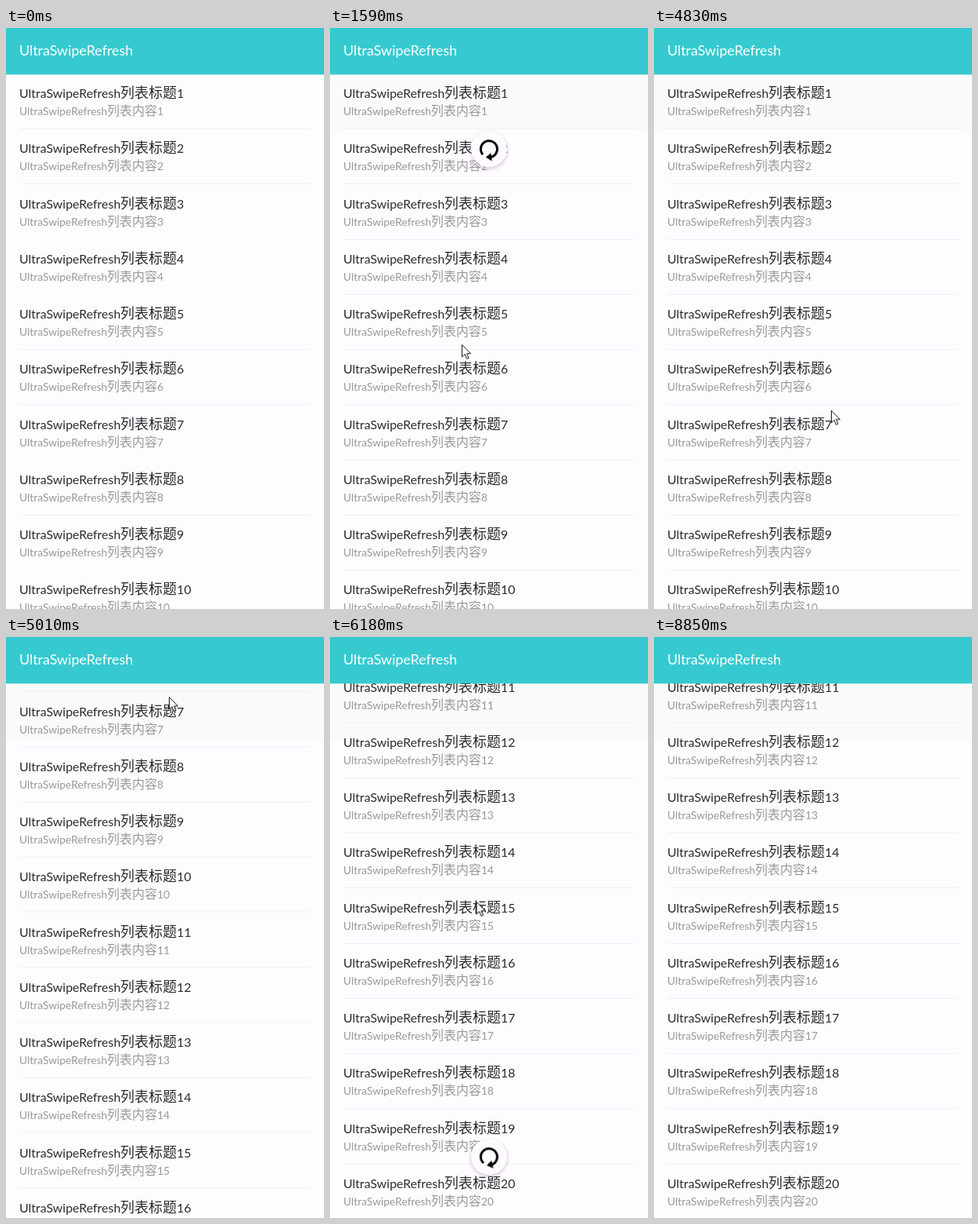
Write an HTML page that moves like this. It is 406 by 740 pixels and loops after 9510 ms.

```html
<!DOCTYPE html>
<html lang="zh">
<head>
<meta charset="utf-8">
<title>UltraSwipeRefresh</title>
<style>
  html, body { margin: 0; width: 100%; height: 100%; overflow: hidden; }
  body { position: relative; background: #fefcff; }
  header, main, .tint, .glow, .row, .row *, .puck, .cursor { position: absolute; }
  header {
    inset: 0 0 auto; height: 59px; padding-left: 17px;
    background: #36cad0; color: #fff;
    box-shadow: 0 1px rgba(54, 202, 208, .35);
    font: 17.9px/57px Lato, sans-serif;
  }
  main { inset: 59px 0 0; overflow: hidden; }
  .tint { inset: 0 0 auto; height: 70px; background: #f8fafb; }
  .glow {
    left: -37px; top: 644px; width: 480px; height: 80px;
    border-radius: 50%; background: #96649e;
  }
  .row { left: 17px; width: 372px; height: 70.25px; white-space: nowrap; }
  .row p { margin: 0; left: 0; font: 300 18px/20px "Noto Sans CJK SC", "Noto Sans CJK", sans-serif; }
  .title { top: 12px; color: #2c2b2e; }
  .row .note { top: 35px; color: #99989b; font-size: 16px; }
  .row span { left: 0; }
  .row .tail { left: 129px; }
  .note .tail { left: 112px; }
  .row b { position: static; font: 400 .885em/1px Lato, sans-serif; }
  .row .note b { font-size: .865em; }
  .row hr { left: 0; top: 69px; width: 100%; height: 1px; margin: 0; border: 0; background: #eff1f3; }
  .puck {
    left: 180px; top: -82px; width: 46px; height: 46px; border-radius: 50%;
    background: #fefbff; box-shadow: 0 2px 5px rgba(60, 30, 60, .26);
  }
  .puck svg { display: block; }
  .puck path { fill: none; stroke: #000; stroke-width: 3; }
  .puck .head { fill: #000; stroke: none; }
  .cursor { left: 0; top: 0; overflow: visible; }
</style>
</head>
<body>
<main>
  <div class="tint"></div>
  <div id="list"></div>
  <div class="glow"></div>
</main>
<header>UltraSwipeRefresh</header>
<svg class="cursor" width="13" height="20">
  <path d="M.5 .5V16l3.6-3.4 2.4 5.8 2.5-1-2.4-5.6h5z" fill="#fff" stroke="#111"/>
</svg>
<script>
const LOOP = 9510, ROW = 70.25, PRESS = 750;
const $ = s => document.querySelector(s);

// frames: [ms, value, easing towards the next one]
function play(el, prop, frames) {
  const keys = frames.map(([ms, v, easing = 'linear']) => ({ offset: ms / LOOP, [prop]: v, easing }));
  if (keys[0].offset > 0) keys.unshift({ ...keys[0], offset: 0, easing: 'linear' });
  keys.push({ ...keys[keys.length - 1], offset: 1 });
  el.animate(keys, { duration: LOOP, iterations: Infinity });
}
const moveY = (el, frames) =>
  play(el, 'transform', frames.map(([ms, y, e]) => [ms, `translateY(${y}px)`, e]));
const hold = (el, frames) =>
  play(el, 'opacity', [[0, 0], ...frames].map(([ms, v]) => [ms, v, 'step-end']));

// List
const line = (cls, label, n) =>
  `<p class="${cls}"><span><b>UltraSwipeRefresh</b></span><span class="tail">${label}<b>${n}</b></span></p>`;
for (let n = 1; n <= 20; n++) {
  const row = document.createElement('div');
  row.className = 'row';
  row.style.top = (n - 1) * ROW + 'px';
  row.innerHTML = line('title', '列表标题', n) + line('note', '列表内容', n) + '<hr>';
  $('#list').append(row);
  // these hairlines only show once the list is touched
  if ([3, 4, 7, 9].includes(n)) hold(row.querySelector('hr'), [[PRESS, 1]]);
}
moveY($('#list'), [[4840, 0], [5040, -480, 'ease-out'], [5270, -722]]);
play($('.tint'), 'opacity', [[PRESS, 0], [850, 1]]);
play($('.glow'), 'opacity', [[5200, 0], [5300, .08], [5360, .08], [5700, 0]]);

// Mouse pointer
play($('.cursor'), 'transform', [
  [90, 378, 88, 'ease-in-out'], [540, 167, 66], [PRESS, 167, 70],
  [1590, 168, 402], [1690, 177, 485], [1720, 178, 488], [1830, 210, 448],
  [1950, 265, 386], [2070, 320, 355], [2200, 372, 333], [4380, 378, 474],
  [4660, 232, 597], [4720, 231, 592], [4830, 226, 489],
  [5040, 205, 10, 'ease-in-out'], [5340, 143, 516, 'ease-out'],
  [5500, 160, 620], [6270, 190, 300], [6480, 190, 300],
  [6700, 278, 318], [6960, 382, 320], [7050, 395, 325]
].map(([ms, x, y, e]) => [ms, `translate(${x}px, ${y}px)`, e]));
hold($('.cursor'), [[90, 1], [2220, 0], [4380, 1], [7020, 0]]);

// Refresh indicators
const R = 10.5;
const point = deg => {
  const a = deg * Math.PI / 180;
  return `${(R * Math.cos(a)).toFixed(2)} ${(R * Math.sin(a)).toFixed(2)}`;
};
const arc = (from, sweep) =>
  `M${point(from)}A${R} ${R} 0 ${sweep > 180 ? 1 : 0} 1 ${point(from + sweep)}`;

function addPuck({ start, reach, release, settle, path, phase }) {
  const el = document.createElement('div');
  el.className = 'puck';
  el.innerHTML = `<svg width="46" height="46" viewBox="-23 -23 46 46">
    <g><path d="${arc(138, 302)}"/><path class="head" d="M2.6 5L-4 10.6L3.8 15.2z"/></g>
    <path class="spin"/></svg>`;
  $('main').append(el);
  moveY(el, path);
  const arrow = el.querySelector('g'), spin = el.querySelector('.spin');
  play(arrow, 'transform', [[start, 'rotate(-240deg)'], [reach, 'rotate(0deg)'], [release, 'rotate(30deg)']]);
  play(arrow, 'opacity', [[start, .3], [(start + reach) / 2, 1], [release, 1], [settle, 0]]);
  play(spin, 'opacity', [[release, 0], [settle, 1]]);
  return { spin, phase };
}
const pucks = [
  addPuck({
    start: PRESS, reach: 1590, release: 1700, settle: 1820, phase: 1990,
    path: [[PRESS, 28], [1590, 154], [1690, 172], [1700, 172, 'ease-out'], [1990, 96],
           [3700, 96, 'ease-in-out'], [4070, 28]]
  }),
  addPuck({
    start: 5500, reach: 6200, release: 6450, settle: 6570, phase: 6010,
    path: [[5500, 770], [6270, 648], [6450, 648, 'ease-out'], [6720, 706],
           [8460, 706, 'ease-in-out'], [8840, 770]]
  })
];

// cubic-bezier(.4, 0, .2, 1)
function ease(x) {
  if (x <= 0) return 0;
  if (x >= 1) return 1;
  let lo = 0, hi = 1, u;
  for (let i = 0; i < 20; i++) {
    u = (lo + hi) / 2;
    const at = 1.2 * u * (1 - u) ** 2 + .6 * u * u * (1 - u) + u ** 3;
    if (at < x) lo = u; else hi = u;
  }
  return 3 * u * u * (1 - u) + u ** 3;
}

// One turn: the head runs ahead, then the tail catches up
const TURN = 1332;
function spinnerArc(ms) {
  const turn = Math.floor(ms / TURN), p = ms / TURN - turn;
  const head = 290 * ease(p * 2), tail = 290 * ease(p * 2 - 1);
  return arc(tail - 90 + turn * 216 + p * 286, Math.max(head - tail, 2));
}

let first;
function draw(now) {
  first ??= now;
  const t = (now - first) % LOOP;
  for (const { spin, phase } of pucks) spin.setAttribute('d', spinnerArc(t - phase));
  requestAnimationFrame(draw);
}
requestAnimationFrame(draw);
</script>
</body>
</html>
```
